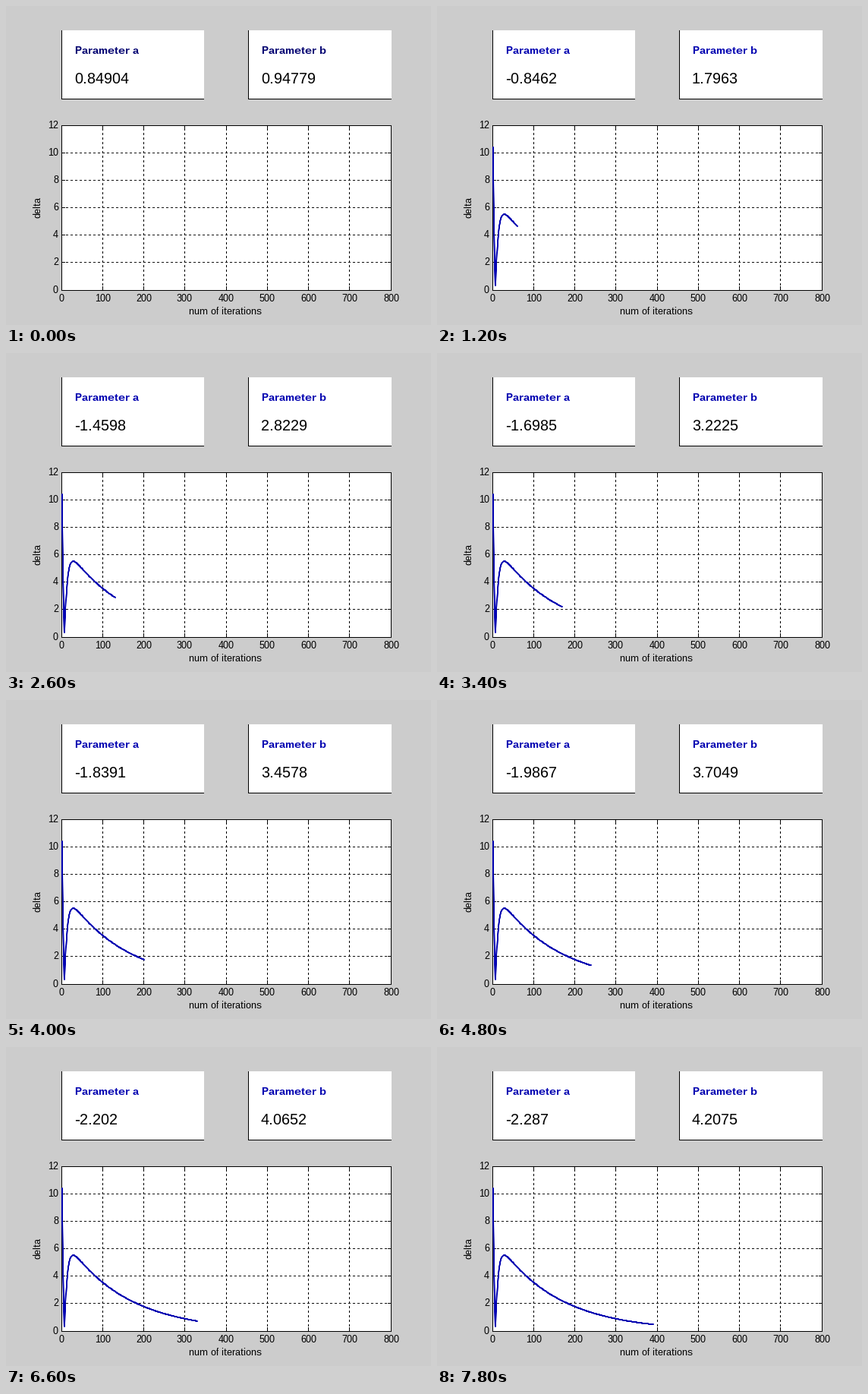
Write a matplotlib script that moves like this. It is 560 px wide and 420 px high and loops after 8000 ms.

```python
import math

import numpy as np
import matplotlib.pyplot as plt
from matplotlib.animation import FuncAnimation
from matplotlib.patches import Rectangle

W, H, DPI = 560, 420, 100
PX = 72 / DPI                      # one pixel in points
FRAMES, INTERVAL, STEP = 40, 200, 10

LEFT, RIGHT, TOP, BOTTOM = 73, 507, 157, 374
X_MAX, Y_MAX = 800, 12

SLOW, FAST = 0.0068665, 0.151      # decay rates of the two descent modes
BLUE, NAVY = "#0000b0", "#000070"

# Whole-pixel glyph widths, as on a classic desktop.
plt.rcParams.update({
    "font.family": "Liberation Sans",
    "text.hinting": "native",
    "text.hinting_factor": 1,
})

fig = plt.figure(figsize=(W / DPI, H / DPI), dpi=DPI, facecolor="#cccccc")
ax = fig.add_axes([0, 0, 1, 1])
ax.set_xlim(0, W)
ax.set_ylim(H, 0)
ax.axis("off")


def rule(x0, y0, x1, y1, style="-"):
    ax.plot([x0, x1], [y0, y1], color="black", lw=PX, ls=style, snap=False,
            solid_capstyle="butt", dash_capstyle="butt")


def label(x, y, text, size=13, ha="center", **kw):
    kw.setdefault("va", "baseline")
    return ax.text(x, y, text, fontsize=size * PX, ha=ha, **kw)


def panel(x, width, title):
    """White read-out box; returns its title and its value text."""
    ax.add_patch(Rectangle((x, 32), width, 91, fc="white", lw=0))
    rule(x + 0.5, 32, x + 0.5, 123)
    rule(x, 122.5, x + width, 122.5)
    head = label(x + 18, 63, title, 14, "left", weight="bold", color=BLUE)
    value = label(x + 17, 102, "", 20, "left")
    return head, value


def draw_axes():
    w, h = RIGHT - LEFT, BOTTOM - TOP
    ax.add_patch(Rectangle((LEFT, TOP), w + 1, h + 1, fc="white", lw=0))
    dotted = (0, (3, 3))
    for i in range(9):
        x = math.floor(LEFT + w * i / 8) + 0.5
        if 0 < i < 8:
            rule(x, BOTTOM, x, TOP, dotted)
            rule(x, BOTTOM, x, BOTTOM - 5)
            rule(x, TOP, x, TOP + 5)
        label(x, 389, str(100 * i))
    for i in range(7):
        y = math.floor(BOTTOM - h * i / 6) + 0.5
        if 0 < i < 6:
            rule(LEFT, y, RIGHT, y, dotted)
            rule(LEFT, y, LEFT + 5, y)
            rule(RIGHT + 1, y, RIGHT - 4, y)
        label(69, y + 3.7, str(2 * i), ha="right")
    for y in (TOP + 0.5, BOTTOM + 0.5):
        rule(LEFT, y, RIGHT + 1, y)
    for x in (LEFT + 0.5, RIGHT + 0.5):
        rule(x, TOP, x, BOTTOM + 1)
    label(289, 406, "num of iterations")
    label(48, 265, "delta", ha="right", va="center", rotation=90)


def params(k):
    slow, fast = math.exp(-SLOW * k), math.exp(-FAST * k)
    a = -2.453793 + 2.42702 * slow + 0.875813 * fast
    b = 4.486529 - 4.06179 * slow + 0.523051 * fast
    return a, b


def delta(k):
    return np.abs(7.0 * np.exp(-SLOW * k) - 17.4 * np.exp(-FAST * k))


head_a, value_a = panel(73, 188, "Parameter a")
head_b, value_b = panel(319, 189, "Parameter b")
draw_axes()
curve, = ax.plot([], [], color=BLUE, lw=2 * PX, snap=False,
                 solid_joinstyle="round", solid_capstyle="round")


def update(frame):
    n = frame * STEP
    i = np.arange(1, n + 1)
    x = LEFT + i * (RIGHT - LEFT) / X_MAX
    y = BOTTOM - delta(i - 1) * (BOTTOM - TOP) / Y_MAX
    curve.set_data(np.round(x), np.round(y))
    for text, value in zip((value_a, value_b), params(n)):
        text.set_text(f"{value:.5g}")
    for head in (head_a, head_b):
        head.set_color(BLUE if frame else NAVY)
    return curve, value_a, value_b, head_a, head_b


anim = FuncAnimation(fig, update, frames=FRAMES, interval=INTERVAL,
                     repeat=True, repeat_delay=0)
plt.show()
```
